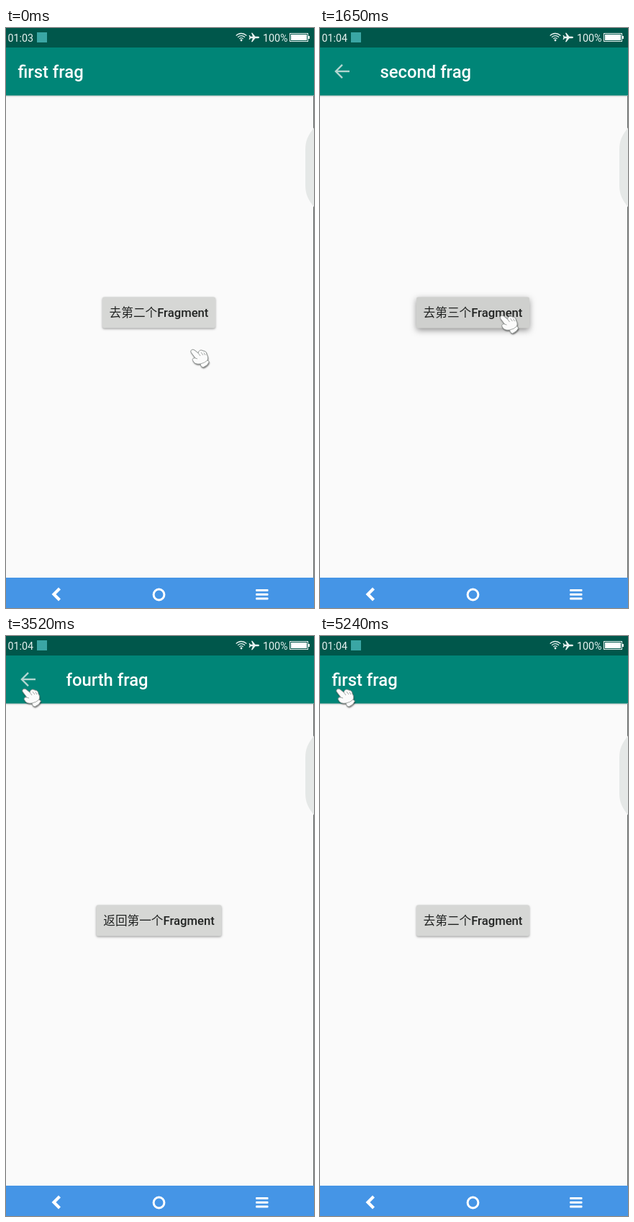
Recreate the animation shown at these times as an HTML page with a canvas. Size 428x803 px, loop 5940 ms.

```html
<!DOCTYPE html>
<html lang="zh">
<head>
<meta charset="utf-8">
<title>Fragments</title>
<style>
html, body { margin: 0; width: 100%; height: 100%; overflow: hidden; background: #fafafa; }
canvas { display: block; width: 428px; height: 803px; }
</style>
</head>
<body>
<canvas id="stage"></canvas>
<script>
const W = 428, H = 803, LOOP = 5940;
const canvas = document.getElementById('stage');
const ctx = canvas.getContext('2d');
const ratio = window.devicePixelRatio || 1;
canvas.width = W * ratio;
canvas.height = H * ratio;

const LATIN = 'Roboto, sans-serif';
const HAN = '"Noto Sans CJK SC", "Noto Sans CJK", sans-serif';

const pages = [
  { title: 'first frag', label: '去第二个' },
  { title: 'second frag', label: '去第三个' },
  { title: 'third frag', label: '去第四个' },
  { title: 'fourth frag', label: '返回第一个' }
];
// [time, page]
const visits = [[0, 0], [950, 1], [1700, 2], [2400, 3], [3840, 2], [4460, 1], [5070, 0]];
// [press, release]
const presses = [[820, 950], [1560, 1700], [2260, 2400]];
const backTaps = [[3710, 3840], [4320, 4460], [4930, 5070]];
// [time, x, y]
const route = [
  [0, 256, 444], [330, 256, 444], [440, 252, 416], [540, 249.5, 397],
  [2895, 249.5, 397], [2950, 212, 350], [3020, 119, 230], [3130, 62, 135],
  [3260, 30, 92], [3400, 18, 74], [3520, 22, 72]
];

const clamp = v => Math.max(0, Math.min(1, v));
const lerp = (a, b, k) => a + (b - a) * k;

function fillRect(color, x, y, w, h) {
  ctx.fillStyle = color;
  ctx.fillRect(x, y, w, h);
}

function roundBox(color, x, y, w, h, r) {
  ctx.fillStyle = color;
  ctx.beginPath();
  ctx.roundRect(x, y, w, h, r);
  ctx.fill();
}

function line(color, width, ...pts) {
  ctx.strokeStyle = color;
  ctx.lineWidth = width;
  ctx.beginPath();
  for (let i = 0; i < pts.length; i += 2) ctx.lineTo(pts[i], pts[i + 1]);
  ctx.stroke();
}

function text(str, x, y, font, color) {
  ctx.font = font;
  ctx.fillStyle = color;
  ctx.fillText(str, x, y);
  return ctx.measureText(str).width;
}

function disc(color, x, y, r) {
  ctx.fillStyle = color;
  ctx.beginPath();
  ctx.arc(x, y, r, 0, Math.PI * 2);
  ctx.fill();
}

function statusBar(t) {
  const ink = '#e8f2f0';
  fillRect('#00574b', 0, 0, W, 27);
  text(t < 200 ? '01:03' : '01:04', 2.5, 18.5, `14.3px ${LATIN}`, ink);
  fillRect('#3aa6a4', 43, 6, 14, 14);

  // Wi-Fi
  ctx.strokeStyle = ink;
  ctx.lineWidth = 1.3;
  for (const r of [3.6, 6.8, 10]) {
    ctx.beginPath();
    ctx.arc(327, 17.5, r, -Math.PI * 0.76, -Math.PI * 0.24);
    ctx.stroke();
  }
  disc(ink, 327, 17, 1.4);

  // Flight mode
  ctx.fillStyle = ink;
  ctx.fill(new Path2D('M352 13q0-1.2-2-1.2h-3.6l-4-5h-1.5l2 5h-3l-1.2-1.8h-1.1l.8 3-.8 3h1.1l1.2-1.8h3l-2 5h1.5l4-5h3.6q2 0 2-1.2z'));

  text('100%', 357, 18.5, `14.3px ${LATIN}`, ink);
  ctx.strokeStyle = ink;
  ctx.lineWidth = 1;
  ctx.strokeRect(394.5, 7.5, 25, 11);
  fillRect('#ffffff', 396, 9, 22, 8);
  fillRect(ink, 420, 11, 2, 4);
}

function toolbar(t, page) {
  fillRect('#008577', 0, 27, W, 66.5);
  const shade = ctx.createLinearGradient(0, 93, 0, 96);
  shade.addColorStop(0, 'rgba(0,0,0,.22)');
  shade.addColorStop(1, 'rgba(0,0,0,0)');
  fillRect(shade, 0, 93.5, W, 2.5);
  if (page > 0) {
    for (const [down, up] of backTaps) {
      if (t < down || t > up + 240) continue;
      const grow = 1 - (1 - clamp((t - down) / 180)) ** 2;
      const fade = 1 - clamp((t - up) / 240);
      disc(`rgba(255,255,255,${0.2 * fade})`, 31, 60, lerp(6, 22, grow));
    }
    line('#b2d6d1', 2.4, 41, 60, 22.5, 60);
    line('#b2d6d1', 2.4, 31, 50.8, 21.9, 60, 31, 69.2);
  }
  text(pages[page].title, page ? 83.5 : 16.5, 69, `500 23.8px ${LATIN}`, '#fff');
}

function button(t, page) {
  const { label } = pages[page];
  const hanFont = `16.65px ${HAN}`;
  const latinFont = `500 16.65px ${LATIN}`;
  const w = label.length === 4 ? 157 : 174;
  const x = 212.5 - w / 2;
  let lift = 0;
  for (const [down, up] of presses) {
    if (t >= down && t < up) lift = clamp((t - down) / 90);
  }
  ctx.save();
  ctx.shadowColor = `rgba(0,0,0,${lerp(0.36, 0.42, lift)})`;
  ctx.shadowBlur = lerp(3, 8, lift) * ratio;
  ctx.shadowOffsetY = lerp(1.2, 3, lift) * ratio;
  const tone = [214, 215, 213].map(c => Math.round(c - 7 * lift));
  roundBox(`rgb(${tone})`, x, 372.5, w, 43, 2.4);
  ctx.restore();

  ctx.font = hanFont;
  const hanWidth = ctx.measureText(label).width;
  ctx.font = latinFont;
  const start = 212.5 - (hanWidth + ctx.measureText('Fragment').width) / 2;
  text(label, start, 400, hanFont, '#222423');
  text('Fragment', start + hanWidth, 400, latinFont, '#222423');
}

function sideTab() {
  fillRect('#626866', 427, 94, 1, 667);
  ctx.fillStyle = '#e5e8e7';
  ctx.fill(new Path2D('M428 138C420 148 416 156 416 168V218C416 230 420 238 428 248Z'));
}

function navBar() {
  fillRect('#4595e6', 0, 761, W, 42);
  line('#fff', 4.2, 74.5, 776, 66.5, 784, 74.5, 792);
  ctx.lineWidth = 3;
  ctx.beginPath();
  ctx.arc(212.5, 784.5, 7.4, 0, Math.PI * 2);
  ctx.stroke();
  for (const y of [777, 782.7, 788.4]) roundBox('#fff', 347, y, 17.5, 3, 1);
}

const hand = new Path2D('M1 5C0 2 3 0 6 2L11 6C12 2 15 1 18 3C21 3 23 5 23 8C25 11 25 13 24 16L26.5 18Q25 23 18 26L15 24.5L14 21C9 22 5 20 4 17C2 15 4 12 7 13Z');
const folds = new Path2D('M11 6L14 10M15 5L18 9M19 5.5L21 9M7 13L10 14M14 21Q20 20 24 16');

function pointer(t) {
  let i = 0;
  while (i < route.length - 1 && t >= route[i + 1][0]) i++;
  const a = route[i], b = route[i + 1] || a;
  const k = b === a ? 0 : (t - a[0]) / (b[0] - a[0]);
  ctx.save();
  ctx.translate(lerp(a[1], b[1], k), lerp(a[2], b[2], k));
  ctx.shadowColor = 'rgba(0,0,0,.55)';
  ctx.shadowBlur = 2 * ratio;
  ctx.shadowOffsetX = ratio * 0.6;
  ctx.shadowOffsetY = ratio * 1.6;
  ctx.fillStyle = '#fbfbfb';
  ctx.fill(hand);
  ctx.shadowColor = 'transparent';
  ctx.lineWidth = 1;
  ctx.lineJoin = 'round';
  ctx.strokeStyle = '#8d9290';
  ctx.stroke(hand);
  ctx.strokeStyle = '#a2a6a4';
  ctx.stroke(folds);
  ctx.restore();
}

function draw(t) {
  let page = 0;
  for (const [at, next] of visits) if (t >= at) page = next;
  ctx.setTransform(ratio, 0, 0, ratio, 0, 0);
  fillRect('#fafafa', 0, 0, W, H);
  statusBar(t);
  toolbar(t, page);
  sideTab();
  button(t, page);
  navBar();
  pointer(t);
}

const begin = performance.now();
function tick() {
  draw((performance.now() - begin) % LOOP);
  requestAnimationFrame(tick);
}
tick();
</script>
</body>
</html>
```
